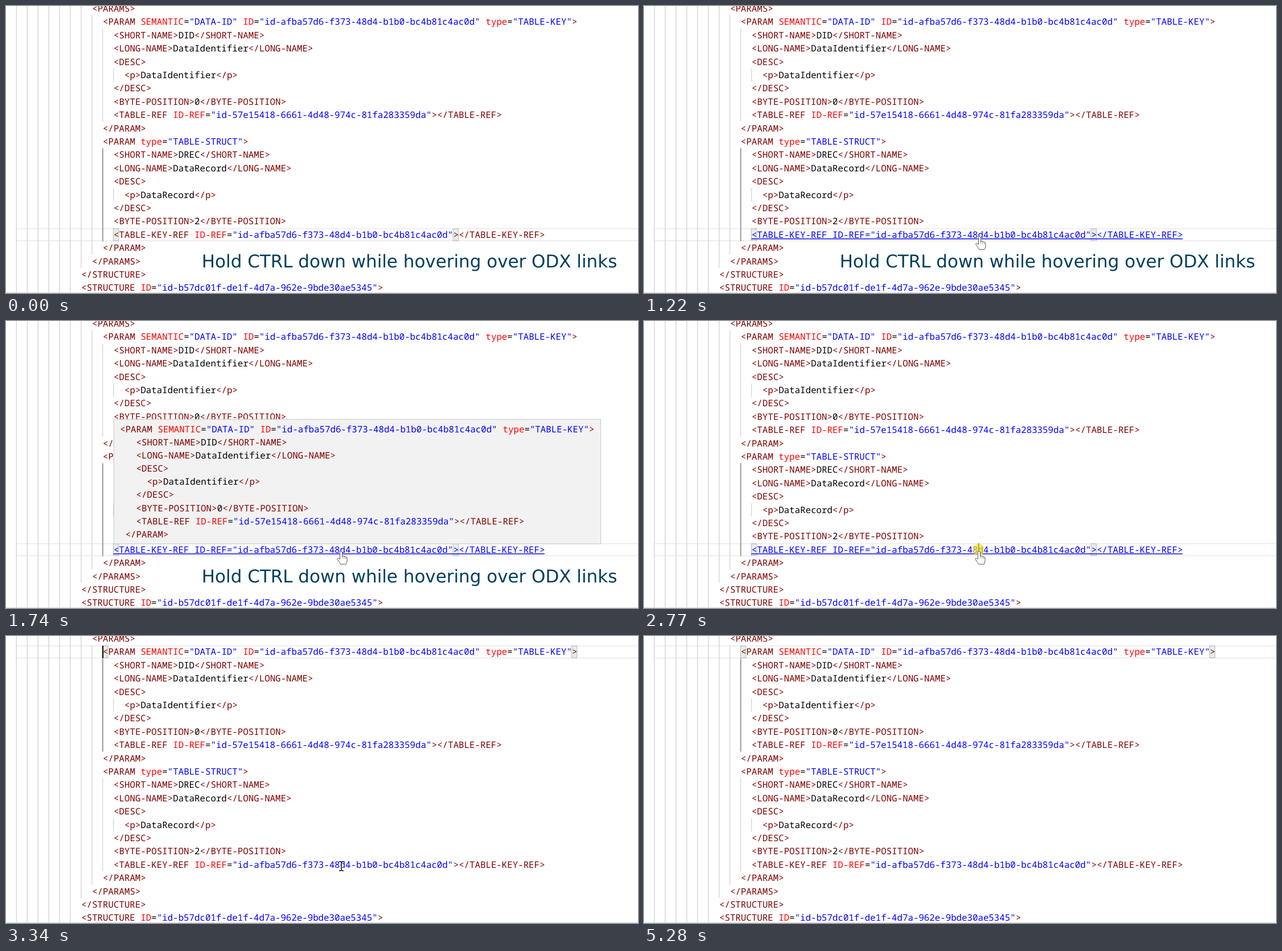
An HTML page for the animation above (5450 ms loop, 1110 px wide and 505 px high).

```html
<!DOCTYPE html>
<html lang="en">
<head>
<meta charset="utf-8">
<title>Hovering over ODX links</title>
<style>
  html, body { margin: 0; width: 100%; height: 100%; overflow: hidden; background: #fff; }
  svg { display: block; width: 1110px; height: 505px; }
  text { text-rendering: geometricPrecision; white-space: pre; }
  .code { font: 15.78px "Noto Sans Mono", "DejaVu Sans Mono", monospace; }
  .caption { font: 30.98px "DejaVu Sans", Verdana, sans-serif; fill: #003f5c; }
</style>
</head>
<body>
<svg id="stage" viewBox="0 0 1110 505"></svg>
<script>
const LOOP = 5450, FRAME = 78;
const CHAR = 9.47, ROW = 23.4, LEFT = 18, INSET = 0.6;
const TAG = '#800000', ATTR = '#ff0000', STRING = '#0000ff', PLAIN = '#000000';
const LINK_ROW = 17, TARGET_ROW = 1;

const ID = 'id-afba57d6-f373-48d4-b1b0-bc4b81c4ac0d';
const param = [
  [8, `<PARAM SEMANTIC="DATA-ID" ID="${ID}" type="TABLE-KEY">`],
  [9, '<SHORT-NAME>DID</SHORT-NAME>'],
  [9, '<LONG-NAME>DataIdentifier</LONG-NAME>'],
  [9, '<DESC>'],
  [10, '<p>DataIdentifier</p>'],
  [9, '</DESC>'],
  [9, '<BYTE-POSITION>0</BYTE-POSITION>'],
  [9, '<TABLE-REF ID-REF="id-57e15418-6661-4d48-974c-81fa283359da"></TABLE-REF>'],
  [8, '</PARAM>'],
];
const lines = [
  [7, '<PARAMS>'],
  ...param,
  [8, '<PARAM type="TABLE-STRUCT">'],
  [9, '<SHORT-NAME>DREC</SHORT-NAME>'],
  [9, '<LONG-NAME>DataRecord</LONG-NAME>'],
  [9, '<DESC>'],
  [10, '<p>DataRecord</p>'],
  [9, '</DESC>'],
  [9, '<BYTE-POSITION>2</BYTE-POSITION>'],
  [9, `<TABLE-KEY-REF ID-REF="${ID}"></TABLE-KEY-REF>`],
  [8, '</PARAM>'],
  [7, '</PARAMS>'],
  [6, '</STRUCTURE>'],
  [6, '<STRUCTURE ID="id-b57dc01f-de1f-4d7a-962e-9bde30ae5345">'],
];

const stage = document.getElementById('stage');
const indent = level => LEFT + level * 2 * CHAR;
const rowTop = row => 16.3 + (row - 1) * ROW;
const rowMid = row => rowTop(row) + ROW / 2;

function add(parent, name, attrs = {}, content) {
  const el = document.createElementNS('http://www.w3.org/2000/svg', name);
  for (const key in attrs) el.setAttribute(key, attrs[key]);
  if (content) el.textContent = content;
  parent.appendChild(el);
  return el;
}
const group = (parent = stage) => add(parent, 'g');
const rect = (parent, x, y, width, height, fill, more) =>
  add(parent, 'rect', { x, y, width, height, fill, ...more });

function codeLine(parent, source, x, mid, color) {
  const token = /(<\/?[\w-]+|>)|([\w-]+)(?==)|("[^"]*")|[^<>\s="]+|=/g;
  for (const m of source.matchAll(token)) {
    const fill = color || (m[1] ? TAG : m[2] ? ATTR : m[3] ? STRING : PLAIN);
    add(parent, 'text', { class: 'code', x: x + m.index * CHAR, y: mid + 5.4, fill }, m[0]);
  }
}

function guide(parent, level, from, to, fill = '#d6d6d6', width = 1.4) {
  rect(parent, indent(level) - 0.4, rowTop(from), width, (to - from + 1) * ROW, fill);
}

const rowFrame = row => rect(stage, LEFT, rowTop(row) + 1, 1110, ROW - 2, 'none',
  { stroke: '#eeeeee', 'stroke-width': 2 });

// Active guide and matching brackets around the text cursor
function activeMarks(row, guideFrom, bracketCols) {
  const g = group();
  guide(g, 8, guideFrom, guideFrom + 6, '#8f8f8f', 1.6);
  for (const col of bracketCols)
    rect(g, indent(lines[row][0]) + col * CHAR, rowTop(row) + 1.2, CHAR, ROW - 2.4,
      'rgba(0,100,0,.1)', { stroke: '#b9b9b9' });
  return g;
}

const linkFrame = rowFrame(LINK_ROW), targetFrame = rowFrame(TARGET_ROW);

const guides = group();
for (let level = 0; level < 6; level++) guide(guides, level, 0, 22);
guide(guides, 6, 0, 19);
guide(guides, 7, 1, 18);
for (const first of [2, 11]) {
  guide(guides, 8, first, first + 6);
  guide(guides, 9, first + 3, first + 3);
}

const linkMarks = activeMarks(LINK_ROW, 11, [0, 63]);
const targetMarks = activeMarks(TARGET_ROW, 2, [0, 87]);

const flash = group();
for (let row = 1; row <= 9; row++) {
  const [level, source] = lines[row];
  const from = row === 1 ? indent(level) : LEFT;
  rect(flash, from, rowTop(row), indent(level) + source.length * CHAR - from, ROW, 'rgba(234,92,0,.33)');
}

const plainLink = group(), hotLink = group(), code = group();
lines.forEach(([level, source], row) => {
  codeLine(row === LINK_ROW ? plainLink : code, source, indent(level) + INSET, rowMid(row));
});
const linkX = indent(9), linkText = lines[LINK_ROW][1];
codeLine(hotLink, linkText, linkX + INSET, rowMid(LINK_ROW), STRING);
rect(hotLink, linkX, 409, linkText.length * CHAR, 1.4, STRING);

rect(stage, 0, 504, 1110, 1, '#d8d8d8');

const popup = group();
rect(popup, 189.5, 173, 855, 219, '#f2f2f2', { stroke: '#c8c8c8' });
param.forEach(([level, source], i) => {
  const col = i === 0 ? 0 : 1 + (level - 8) * 2;
  codeLine(popup, source, 200.2 + col * CHAR, 190.5 + i * 23.1);
});

const caption = add(stage, 'text', { class: 'caption', x: 343.8, y: 459.5 },
  'Hold CTRL down while hovering over ODX links');

const linkCaret = rect(stage, 587, 391.5, 1.8, 22, '#000');
const targetCaret = rect(stage, indent(8) - 0.4, 17, 2, 22, '#000');
const click = add(stage, 'circle', { cx: 587.5, cy: 402.5, r: 10.5, fill: '#f7e825', opacity: 0.68 });

const beam = group();
const beamPath = 'M-4-8H-1.5L0-7 1.5-8H4M0-7V7M-4 8H-1.5L0 7 1.5 8H4';
add(beam, 'path', { d: beamPath, fill: 'none', stroke: '#fff', 'stroke-width': 3 });
add(beam, 'path', { d: beamPath, fill: 'none', stroke: '#000', 'stroke-width': 1.5 });

const hand = group();
add(hand, 'path', {
  d: 'M-2.5 14V2a2 2 0 0 1 4 0V9.5a1.6 1.6 0 0 1 3.2.5a1.6 1.6 0 0 1 3 .7a1.4 1.4 0 0 1 2.3 1.3V17' +
     'q0 3-2 6H-1.5q-1-3-5.5-8.5c-1-1.5 1-3 2.5-1.8z',
  fill: '#fff', stroke: '#555', 'stroke-width': 1, 'stroke-linejoin': 'round',
});
add(hand, 'path', { d: 'M1.5 9v4M4.7 10v3.5M7.7 11v3', fill: 'none', stroke: '#777', 'stroke-width': 0.8 });

// Pointer moves: start, end, from x/y, to x/y, easing
const easeOut = p => p * (2 - p);
const easeInOut = p => p * p * (3 - 2 * p);
const moves = [
  [130, 670, 979, 500, 649, 431, easeOut],
  [670, 1300, 649, 431, 589, 405, easeOut],
  [4352, 4900, 589.5, 406, 1052, 501, easeInOut],
];

function pointerAt(t) {
  let pos = null;
  for (const [start, end, x0, y0, x1, y1, ease] of moves) {
    if (t < start) break;
    const steps = Math.round((end - start) / FRAME);
    const step = Math.floor((t - start) / (end - start) * steps + 0.02);
    const p = ease(Math.min(1, step / steps));
    pos = [x0 + (x1 - x0) * p, y0 + (y1 - y0) * p];
  }
  return t < 4980 ? pos : null;
}

const show = (el, on) => el.setAttribute('visibility', on ? 'visible' : 'hidden');
const within = (t, from, to) => t >= from && t < to;

function draw(t) {
  const jumped = t >= 2940;
  const hot = within(t, 1140, 2940);
  const pointing = within(t, 1140, 3020);
  const pos = pointerAt(t);

  for (const el of [linkFrame, linkMarks]) show(el, !jumped);
  for (const el of [targetFrame, targetMarks]) show(el, jumped);
  show(flash, within(t, 2940, 3340));
  show(plainLink, !hot);
  show(hotLink, hot);
  show(popup, within(t, 1610, 2770));
  popup.setAttribute('opacity', t < 1690 ? 0.15 : t < 1740 ? 0.9 : 1);
  show(caption, t < 2770);
  show(linkCaret, within(t, 2770, 2940));
  show(click, within(t, 2770, 2940));
  show(targetCaret, within(t, 2940, 5280));
  show(beam, pos && !pointing);
  show(hand, pos && pointing);
  if (pos) for (const el of [beam, hand]) el.setAttribute('transform', `translate(${pos})`);
}

const begin = performance.now();
function tick() {
  draw((performance.now() - begin) % LOOP);
  requestAnimationFrame(tick);
}
tick();
</script>
</body>
</html>
```
